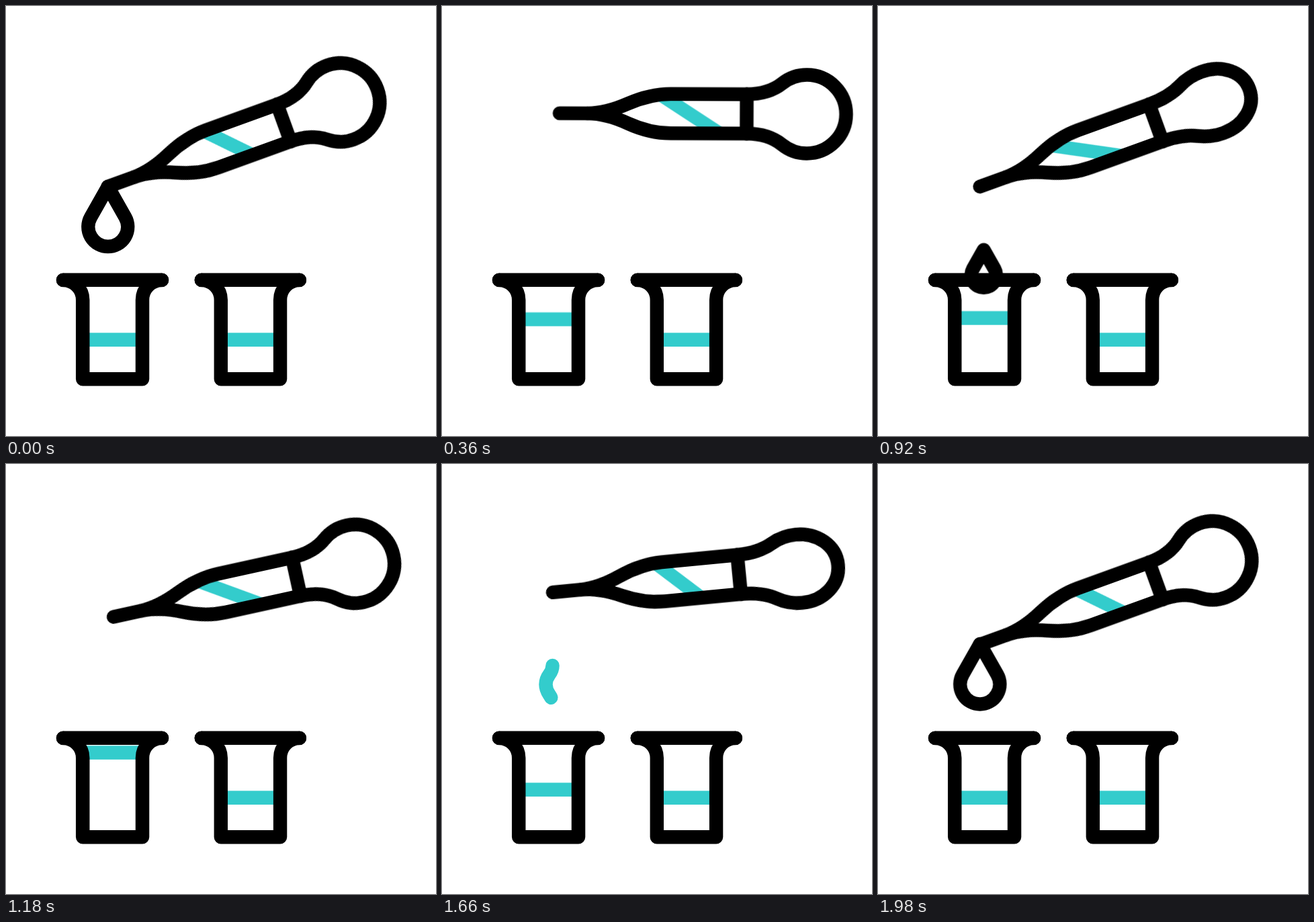
An HTML page without scripts for the animation above (2740 ms loop, 640 by 640 pixels).

```html
<!DOCTYPE html>
<html lang="en">
<head>
<meta charset="utf-8">
<title>Pipette and beakers</title>
<style>
  html, body { margin: 0; width: 100%; height: 100%; overflow: hidden; background: #fff; }
  svg { display: block; width: 100vw; height: 100vh; }
  .ink, .steam { fill: none; stroke: #000; stroke-width: 20.5; stroke-linecap: round; stroke-linejoin: round; }
  .steam { stroke: #3cc; }
  .teal { fill: #3cc; }
  .shift, .tilt, .bulb, .fluid, .drop, .level, .steam, .swell { animation: 2740ms linear infinite; }
  .shift, .tilt, .level { animation-timing-function: cubic-bezier(.37, 0, .63, 1); }

  /* the pipette's travel runs slightly ahead of its turn */
  .shift { animation-name: shift; }
  @keyframes shift {
    0%, 29.71%, 36.82%, 69.05%, 100% { transform: translate(413.5px, 174px); }
    13.14%, 16.57%, 49.96%, 55.91% { transform: translate(453.5px, 160.6px); }
  }
  .tilt { animation-name: tilt; }
  @keyframes tilt {
    0%, 30.22%, 37.59%, 69.05%, 100% { transform: rotate(-19.9deg); }
    13.14%, 17.08%, 50.73%, 55.91% { transform: rotate(.2deg); }
  }

  .bulb { animation-name: squeeze; }
  @keyframes squeeze {
    0%, 28.47%, 40.15%, 54.01%, 64.96%, 100% {
      d: path("M0 -29.3C19 -29.3 37 -32.9 53 -45.7C63.4 -54 76.2 -58.5 89.5 -58.5C121.8 -58.5 148 -32.3 148 0C148 32.3 121.8 58.5 89.5 58.5C76.2 58.5 63.4 54 53 45.7C37 32.9 19 29.3 0 29.3");
    }
    32.85%, 34.31%, 59.12% {
      d: path("M0 -29.3C19 -29.3 37 -32 53 -40C63.4 -45.2 76.2 -48.5 89.5 -48.5C121.8 -48.5 148 -28 148 0C148 28 121.8 48.5 89.5 48.5C76.2 48.5 63.4 45.2 53 40C37 32 19 29.3 0 29.3");
    }
    37.96% {
      d: path("M0 -29.3C19 -29.3 37 -33 53 -47C63.4 -56 76.2 -60.5 89.5 -60.5C121.8 -60.5 148 -33 148 0C148 33 121.8 60.5 89.5 60.5C76.2 60.5 63.4 56 53 47C37 33 19 29.3 0 29.3");
    }
  }

  .fluid { animation-name: slosh; }
  @keyframes slosh {
    0%, 72.26%, 100% { transform: translate(-88px) rotate(46deg); }
    13.14% { transform: translate(-85px) rotate(33deg); }
    22.63% { transform: translate(-100px) rotate(28deg); }
    33.58% { transform: translate(-118px) rotate(28deg); }
    43.07% { transform: translate(-105px) rotate(32.5deg); }
    60.58% { transform: translate(-91px) rotate(42.5deg); }
  }

  .drop { vector-effect: non-scaling-stroke; animation-name: drip; }
  @keyframes drip {
    0%, 72.26%, 100% { transform: translate(151.7px, 268px) scale(1); }
    3.65%, 33.58% { transform: translate(157.3px, 362px) scale(.64); }
    5.47%, 35.2% { transform: translate(158.5px, 407px) scale(0); }
    29.2%, 67.88% { transform: translate(151.7px, 268px) scale(0); }
    31.39% { transform: translate(151.7px, 268px) scale(.85); }
  }

  .level { animation-name: fill; }
  @keyframes fill {
    0%, 5.47%, 64.23%, 100% { transform: translateY(0); }
    14.6%, 35.77% { transform: translateY(-32.3px); }
    44.53%, 51.09% { transform: translateY(-69.5px); }
  }

  .steam { stroke-dasharray: 100 200; animation-name: rise; }
  @keyframes rise {
    0%, 51.09% { stroke-dashoffset: 100; opacity: 0; }
    51.1% { stroke-dashoffset: 100; opacity: 1; }
    56.93%, 57.66% { stroke-dashoffset: 0; opacity: 1; }
    64.23% { stroke-dashoffset: -100; opacity: 1; }
    64.24%, 100% { stroke-dashoffset: -100; opacity: 0; }
  }

  .swell { animation-name: swell; animation-timing-function: ease-in-out; }
  @keyframes swell {
    0%, 44.53%, 59.12%, 100% {
      d: path("M85 408C101 408 114.2 421 114.2 437.5C114.2 477 114.2 516 114.2 555.3H203C203 516 203 477 203 437.5C203 421 216 408 232 408");
    }
    51.82% {
      d: path("M85 408C101 408 112 421 112 437.5C100 477 100 516 114.2 555.3H203C217 516 217 477 205 437.5C205 421 216 408 232 408");
    }
  }
</style>
</head>
<body>
<svg viewBox="0 0 640 640">
  <defs>
    <path id="walls" d="M0 -29.3H-113C-138 -29.3 -158 -23 -177 -14.6S-215 0 -237 0C-215 0 -196 6 -177 14.6S-138 29.3 -113 29.3H0"/>
    <clipPath id="inside"><use href="#walls"/></clipPath>
    <path id="cup" d="M85 408C101 408 114.2 421 114.2 437.5C114.2 477 114.2 516 114.2 555.3H203C203 516 203 477 203 437.5C203 421 216 408 232 408"/>
    <path id="rim" d="M85 407.8H232"/>
    <rect id="band" x="107" y="486.4" width="103" height="20.6"/>
  </defs>

  <path class="steam" pathLength="100" d="M154.5 388C154.5 373 164.5 373 164.5 358S154.5 343 154.5 328S164.5 314 164.5 300"/>

  <use class="teal level" href="#band"/>
  <path class="ink swell" d="M85 408C101 408 114.2 421 114.2 437.5C114.2 477 114.2 516 114.2 555.3H203C203 516 203 477 203 437.5C203 421 216 408 232 408"/>
  <use class="ink" href="#rim"/>

  <g transform="translate(206.3) scale(.994 1)">
    <use class="teal" href="#band"/>
    <use class="ink" href="#cup"/>
    <use class="ink" href="#rim"/>
  </g>

  <path class="ink drop" d="M0 0L-25.7 45.4A29.5 29.5 0 1 0 25.7 45.4Z"/>

  <g class="shift">
    <g class="tilt">
      <g clip-path="url(#inside)">
        <rect class="teal fluid" x="-120" y="-10" width="240" height="20"/>
      </g>
      <g class="ink">
        <use href="#walls"/>
        <path d="M-278.5 0H-237M0 -29.3V29.3"/>
        <path class="bulb" d="M0 -29.3C19 -29.3 37 -32.9 53 -45.7C63.4 -54 76.2 -58.5 89.5 -58.5C121.8 -58.5 148 -32.3 148 0C148 32.3 121.8 58.5 89.5 58.5C76.2 58.5 63.4 54 53 45.7C37 32.9 19 29.3 0 29.3"/>
      </g>
    </g>
  </g>
</svg>
</body>
</html>
```
